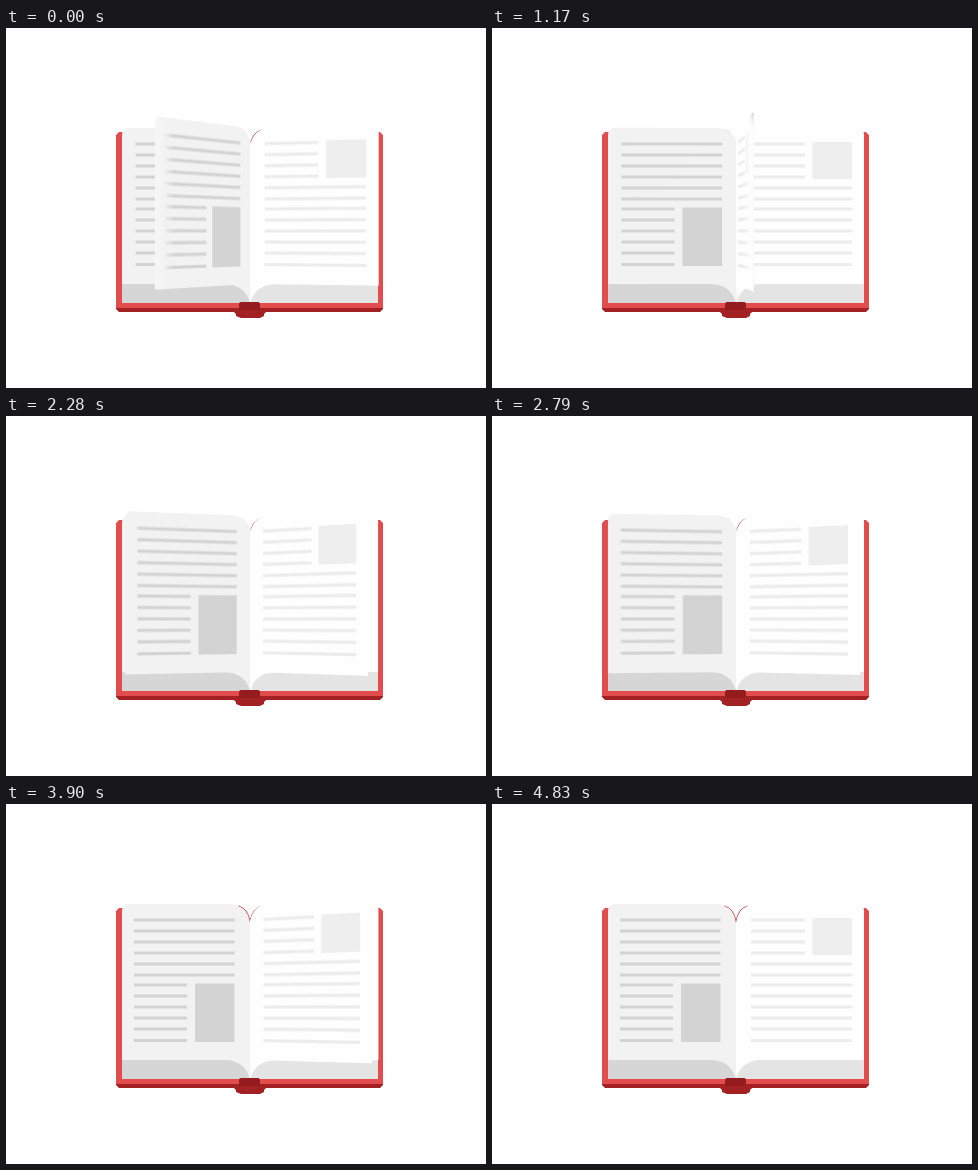
Recreate the animation shown at these times as an HTML page without scripts. Size 480 by 360 pixels, loop 5.31 s.

```html
<!DOCTYPE html>
<html lang="en">
<head>
<meta charset="utf-8">
<title>Book with turning pages</title>
<style>
  html, body { margin: 0; width: 100%; height: 100%; overflow: hidden; background: #fff; }
  .stage { position: relative; width: 100%; height: 100%; overflow: hidden; contain: strict; }
  svg, .scene, .page { position: absolute; left: 0; top: 0; width: 480px; height: 360px; }

  .scene {
    --loop: 5310ms;
    --turn: 754ms;
    perspective: 925px;
    perspective-origin: 244px 205px;
    transform-style: preserve-3d;
    animation: show var(--loop) linear infinite;
  }
  .page { transform-style: preserve-3d; }
  .page, .page svg { transform-origin: 244px 180px; }
  .page svg { backface-visibility: hidden; }
  .back { transform: rotateY(180deg); }

  /* --mid is the moment, in ms, when a page stands upright */
  .page, .haze {
    animation: turn var(--loop) infinite;
    animation-delay: calc(var(--mid) * 1ms - var(--turn) / 2 - var(--loop));
  }
  .haze { animation-name: haze; animation-timing-function: linear; }

  @keyframes turn {
    0% { transform: rotateY(0deg); animation-timing-function: cubic-bezier(.83, 0, .17, 1); }
    14.2%, 21% { transform: rotateY(-180deg); animation-timing-function: step-start; }
    21.01%, 100% { transform: scale(0); }
  }
  @keyframes haze {
    0%, 5.8% { opacity: 0; }
    6.6%, 7.9% { opacity: 1; }
    8.7%, 100% { opacity: 0; }
  }
  /* the book lies still between the two runs and at the end */
  @keyframes show {
    0%, 63.83%, 71.19%, 90.95% { visibility: visible; }
    63.84%, 71.18%, 90.96%, 100% { visibility: hidden; }
  }
</style>
</head>
<body>
<div class="stage">
<svg viewBox="0 0 480 360">
  <defs>
    <path id="sheet" d="M244 119Q247 100 267 100H365Q372 100 372 107V256H268Q249 257 244 275Z"/>
    <linearGradient id="brightEdge">
      <stop offset=".45" stop-color="#fff" stop-opacity="0"/>
      <stop offset=".85" stop-color="#fefefe"/>
      <stop offset="1" stop-color="#fafafa"/>
    </linearGradient>
    <radialGradient id="tip" gradientUnits="userSpaceOnUse" cx="372" cy="98" r="34" gradientTransform="matrix(1 0 0 .45 0 54)">
      <stop stop-color="#bfcdc8"/>
      <stop offset="1" stop-color="#e4e8e6" stop-opacity="0"/>
    </radialGradient>
    <linearGradient id="greyEdge">
      <stop offset=".82" stop-color="#f3f3f3" stop-opacity="0"/>
      <stop offset=".93" stop-color="#f3f3f3"/>
      <stop offset="1" stop-color="#f7f7f7"/>
    </linearGradient>
    <g id="right">
      <use href="#sheet" fill="#fefefe"/>
      <path d="M259 116h54m-54 11h54m-54 11h54m-54 11h54M259 160h101m-101 11h101m-101 10h101m-101 11h101m-101 11h101m-101 11h101m-101 11h101m-101 11.500h101" stroke="#ececec" stroke-width="3"/>
      <path d="M320.500 114h39.500v37h-39.500z" fill="#eee"/>
    </g>
    <g id="left">
      <use href="#sheet" fill="#f2f2f2" transform="matrix(-1 0 0 1 488 0)"/>
      <path d="M128 116h100.500m-100.500 11h100.500m-100.500 11h100.500m-100.500 11h100.500m-100.500 11h100.500m-100.500 11h100.500M128 181h53m-53 11h53m-53 11h53m-53 11h53m-53 11h53m-53 11.500h53" stroke="#d3d3d3" stroke-width="3"/>
      <path d="M189 179.500h39.500v58.500h-39.500z" fill="#d3d3d3"/>
    </g>
    <!-- faces of a turning page; its back sits a little closer to the spine -->
    <g id="backFace"><use href="#left" x="1.500"/></g>
    <g id="frontHaze">
      <use href="#sheet" fill="url(#brightEdge)"/>
      <use href="#sheet" fill="url(#tip)"/>
    </g>
    <g id="backHaze"><use href="#sheet" fill="url(#greyEdge)" transform="matrix(-1 0 0 1 489.500 0)"/></g>
  </defs>

  <!-- cover -->
  <path d="M110 276H377V281L374 284H113L110 281Z" fill="#a32023"/>
  <path d="M110 107L113 104H222V280H110ZM268 104H374L377 107V280H268Z" fill="#e24c4d"/>
  <path d="M110 275H377V280H110Z" fill="#e24c4d"/>
  <path d="M232 102Q242 104 244 118Q246 104 256 102" fill="none" stroke="#d04042"/>
  <path d="M240 111L244 115L248 111L244 121Z" fill="#d83a40"/>

  <!-- page block -->
  <path d="M116 255H244V275H116Z" fill="#d6d6d6"/>
  <path d="M244 255H372V275H244Z" fill="#e5e4e4"/>
  <use href="#left"/>
  <use href="#right"/>
</svg>

<div class="scene">
  <div class="page" style="--mid:-40"><svg><use href="#right"/><use class="haze" href="#frontHaze"/></svg><svg class="back"><use href="#backFace"/><use class="haze" href="#backHaze"/></svg></div>
  <div class="page" style="--mid:150"><svg><use href="#right"/><use class="haze" href="#frontHaze"/></svg><svg class="back"><use href="#backFace"/><use class="haze" href="#backHaze"/></svg></div>
  <div class="page" style="--mid:522"><svg><use href="#right"/><use class="haze" href="#frontHaze"/></svg><svg class="back"><use href="#backFace"/><use class="haze" href="#backHaze"/></svg></div>
  <div class="page" style="--mid:850"><svg><use href="#right"/><use class="haze" href="#frontHaze"/></svg><svg class="back"><use href="#backFace"/><use class="haze" href="#backHaze"/></svg></div>
  <div class="page" style="--mid:1176"><svg><use href="#right"/><use class="haze" href="#frontHaze"/></svg><svg class="back"><use href="#backFace"/><use class="haze" href="#backHaze"/></svg></div>
  <div class="page" style="--mid:1600"><svg><use href="#right"/><use class="haze" href="#frontHaze"/></svg><svg class="back"><use href="#backFace"/><use class="haze" href="#backHaze"/></svg></div>
  <div class="page" style="--mid:1880"><svg><use href="#right"/><use class="haze" href="#frontHaze"/></svg><svg class="back"><use href="#backFace"/><use class="haze" href="#backHaze"/></svg></div>
  <div class="page" style="--mid:2166"><svg><use href="#right"/><use class="haze" href="#frontHaze"/></svg><svg class="back"><use href="#backFace"/><use class="haze" href="#backHaze"/></svg></div>
  <div class="page" style="--mid:2356"><svg><use href="#right"/><use class="haze" href="#frontHaze"/></svg><svg class="back"><use href="#backFace"/><use class="haze" href="#backHaze"/></svg></div>
  <div class="page" style="--mid:2620"><svg><use href="#right"/><use class="haze" href="#frontHaze"/></svg><svg class="back"><use href="#backFace"/><use class="haze" href="#backHaze"/></svg></div>
  <div class="page" style="--mid:2890"><svg><use href="#right"/><use class="haze" href="#frontHaze"/></svg><svg class="back"><use href="#backFace"/><use class="haze" href="#backHaze"/></svg></div>
  <div class="page" style="--mid:3150"><svg><use href="#right"/><use class="haze" href="#frontHaze"/></svg><svg class="back"><use href="#backFace"/><use class="haze" href="#backHaze"/></svg></div>

  <div class="page" style="--mid:3990"><svg><use href="#right"/><use class="haze" href="#frontHaze"/></svg><svg class="back"><use href="#backFace"/><use class="haze" href="#backHaze"/></svg></div>
  <div class="page" style="--mid:4184"><svg><use href="#right"/><use class="haze" href="#frontHaze"/></svg><svg class="back"><use href="#backFace"/><use class="haze" href="#backHaze"/></svg></div>
  <div class="page" style="--mid:4390"><svg><use href="#right"/><use class="haze" href="#frontHaze"/></svg><svg class="back"><use href="#backFace"/><use class="haze" href="#backHaze"/></svg></div>
  <div class="page" style="--mid:4590"><svg><use href="#right"/><use class="haze" href="#frontHaze"/></svg><svg class="back"><use href="#backFace"/><use class="haze" href="#backHaze"/></svg></div>
</div>

<!-- spine -->
<svg viewBox="0 0 480 360">
  <path d="M227 281H261V283L258 286V288L254 290H235L230 288V286L227 283Z" fill="#a32023"/>
  <path d="M235 274H252Q254 274 254 277V282H233V277Q233 274 235 274Z" fill="#941b1e"/>
</svg>
</div>
</body>
</html>
```
